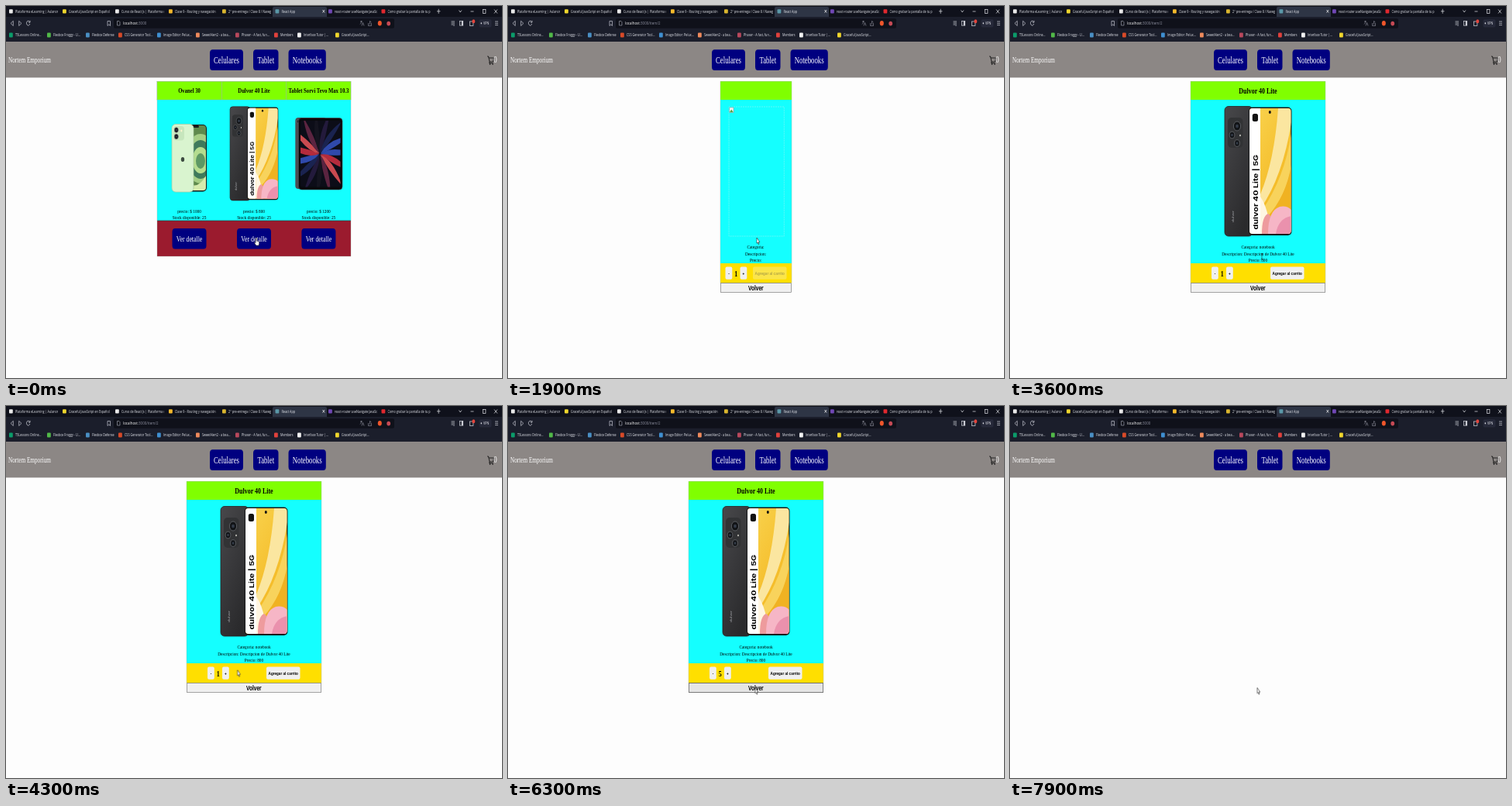
An HTML page that plays this animation: 640 px wide and 480 px high, repeating every 8000 ms.

```html
<!DOCTYPE html>
<html lang="es">
<head>
<meta charset="utf-8">
<title>React App</title>
<style>
html, body { margin: 0; width: 100%; height: 100%; overflow: hidden; background: #fdfdfd; }
svg { display: block; }
#stage { position: absolute; inset: 0; width: 100%; height: 100%; }
.ui { font-family: "Open Sans", sans-serif; font-size: 5px; fill: #e6e8ee; }
.url { font-family: "Open Sans", sans-serif; font-size: 6px; fill: #fff; }
.dim { fill: #8d90a0; }
.brand { font: 9.67px "Liberation Serif", serif; fill: #fff; }
.nav { font: 11.65px "Liberation Serif", serif; fill: #fff; }
.btn { font: 10.4px "Liberation Serif", serif; fill: #fff; }
.name { font: bold 8.9px "Liberation Serif", serif; }
.head { font: bold 10.6px "Liberation Serif", serif; }
.body { font: 7.11px "Liberation Serif", serif; }
.small { font: bold 6.15px "Liberation Sans", sans-serif; }
.back { font: bold 8.8px "Liberation Sans", sans-serif; }
.box { font: bold 10.8px Inter, sans-serif; }
.mid { text-anchor: middle; }

.home, .load, .item, .path, .hover, .hand, .arrow, .beam, .count { animation: 8s step-end infinite; }
.home { animation-name: home; }
.load { animation-name: load; }
.item { animation-name: item; }
.path { animation-name: path; }
.hover { animation-name: hover; }
.hand { animation-name: home; }
.arrow { animation-name: arrow; }
.beam { animation-name: beam; }
.count { animation-name: count; }
.pointer { animation: move 8s linear infinite; }

@keyframes home { 0% { opacity: 1 } 23.75%, 100% { opacity: 0 } }
@keyframes load { 0% { opacity: 0 } 23.75% { opacity: 1 } 45%, 100% { opacity: 0 } }
@keyframes item { 0% { opacity: 0 } 45% { opacity: 1 } 98.75%, 100% { opacity: 0 } }
@keyframes path { 0% { opacity: 0 } 23.75% { opacity: 1 } 98.75%, 100% { opacity: 0 } }
@keyframes hover { 0% { opacity: 0 } 72.5%, 100% { opacity: 1 } }
@keyframes arrow { 0% { opacity: 0 } 23.75% { opacity: 1 } 30% { opacity: 0 } 52.5%, 100% { opacity: 1 } }
@keyframes beam { 0% { opacity: 0 } 30% { opacity: 1 } 52.5%, 100% { opacity: 0 } }
@keyframes count {
  0% { transform: translateX(0) }
  56.25% { transform: translateX(-20px) }
  58.75% { transform: translateX(-40px) }
  61.25% { transform: translateX(-60px) }
  65%, 100% { transform: translateX(-80px) }
}
@keyframes move {
  0%, 23.74% { transform: translate(323px, 299px) }
  23.75%, 25% { transform: translate(321px, 299px); animation-timing-function: steps(5, start) }
  31.25%, 52.5% { transform: translate(325px, 323px); animation-timing-function: steps(3, start) }
  56.25%, 68.75% { transform: translate(285.5px, 349.5px); animation-timing-function: steps(4, start) }
  73.75%, 100% { transform: translate(319px, 363.5px) }
}
</style>
</head>
<body>
<script>
// The page is a 16:9 screen squeezed to 4:3, so all type is narrowed by the same factor.
const SQUEEZE = 0.75;
const text = (x, y, s, cls, extra = '', turn = '') =>
  `<text class="${cls}" transform="translate(${x} ${y}) scale(${SQUEEZE} 1) ${turn}" ${extra}>${s}</text>`;
const rect = (x, y, w, h, fill, extra = '') =>
  `<rect x="${x}" y="${y}" width="${w}" height="${h}" fill="${fill}" ${extra}/>`;
const oval = (x, y, rx, ry, fill, extra = '') =>
  `<ellipse cx="${x}" cy="${y}" rx="${rx}" ry="${ry}" fill="${fill}" ${extra}/>`;
const path = (d, fill, extra = '') => `<path d="${d}" fill="${fill}" ${extra}/>`;
const line = (d, color, w = 0.7) => path(d, 'none', `stroke="${color}" stroke-width="${w}"`);
const clipped = (x, y, w, h, s) => `<svg x="${x}" y="${y}" width="${w}" height="${h}">${s}</svg>`;
const navy = (x, y, w, h) => rect(x, y, w, h, '#000080', 'rx="3.500" ry="4.500"');
const frame = (x, y, w, h) => rect(x, y, w, h, 'none', 'stroke="#9fb5a8" stroke-width=".35"');

const tabs = [
  [4, '#e8e8e8', 'Plataforma eLearning | Aulanortes'],
  [73, '#f0d62c', 'Graceful JavaScript en Español'],
  [141, '#e8e8e8', 'Curso de React Js | Plataforma de'],
  [210, '#f5b92b', 'Clase 9 - Routing y navegación'],
  [279, '#d9b52e', '2° pre-entrega / Clase 8 / Navega'],
  [347.5, '#5a98a8', 'React App'],
  [416, '#7047b5', 'react-router:useNavigate JavaScript'],
  [484.5, '#e0282e', 'Como grabar la pantalla de tu pc']
];
const marks = [
  [4, '#0b9b6a', 'T5Lessons Online...'],
  [53, '#51b848', 'Flexbox Froggy - U...'],
  [103, '#4a8fc4', 'Flexbox Defense'],
  [145, '#d84a28', 'CSS Generator Tool...'],
  [195, '#3f8fd0', 'Image Editor: Pelux...'],
  [245, '#ee8a5c', 'SweetAlert2 - a bea...'],
  [296, '#b8485c', 'Phaser - A fast, fun...'],
  [346, '#e0413c', 'Members'],
  [376, '#f2f2f2', 'Interface Tutor |...'],
  [425, '#f0d62c', 'Graceful JavaScript...']
];

function chrome() {
  let s = rect(0, 0, 640, 14, '#0f111b') + rect(0, 14, 640, 32, '#1b1e2b') +
    path('M344 14V3q0-2 2-2h66q2 0 2 2v11z', '#2e3545');
  for (const [x, color, label] of tabs) {
    s += rect(x, 4.2, 4.8, 5.2, color, 'rx="1"') +
      clipped(x + 8, 0, 55, 14, text(0, 8.8, label, 'ui'));
  }
  s += line('M408.500 5l2.600 3.600M411.100 5L408.500 8.600', '#fff') +
    line('M556 6.800h4.500M558.200 3.800v6M584.500 5.500l1.700 2.500 1.700-2.500M599.500 7h4M630 4.500l4 5M634 4.500l-4 5', '#e4e5ea') +
    rect(615.3, 4.6, 3.6, 4.8, 'none', 'stroke="#e4e5ea" stroke-width=".7"');

  s += rect(139, 16.3, 362, 12.4, '#0f111a', 'rx="2"') +
    line('M9.300 19.300v6.200L6 22.400zM16.700 19.300v6.200L20 22.400z', '#c9cbd4') +
    line('M30.500 20.500a2.200 2.900 0 1 0 .3 2.500M31 18.800v2.400h-2', '#c9cbd4', 0.8) +
    line('M131 19.500h3.500v6l-1.700-1.600-1.800 1.600z', '#c9cbd4') +
    path('M143.500 19.500h2.500l1 1.200v4.300h-3.500z', 'none', 'stroke="#aeb1bd" stroke-width=".6"') +
    text(151, 24.3, 'localhost<tspan class="dim">:3000</tspan><tspan class="dim path">/item/2</tspan>', 'url') +
    line('M457 20h3M458.500 19v1q0 2.500-1.500 3.500M459 25.500l1.500-4 1.500 4M467.500 22v3.500h4V22M469.500 24v-4.500l2 1.500', '#9a9daa', 0.6) +
    oval(482.3, 22.3, 2.5, 3.3, '#f0562b') + oval(493.7, 22.6, 2.4, 2.9, '#c64a55') +
    line('M574.500 20h4.500M574.500 22h4.500M574.500 24h2.500M578 23v3', '#d5d7de') +
    rect(585.5, 19.5, 4.2, 5.6, 'none', 'stroke="#d5d7de" stroke-width=".7"') + rect(587.8, 19.5, 1.9, 5.6, '#d5d7de') +
    rect(598.5, 20, 4.4, 5.4, 'none', 'stroke="#d5d7de" stroke-width=".7"') + oval(603.3, 19.8, 2, 2.5, '#e2453c') +
    rect(610.5, 17.2, 16, 10.2, '#262939', 'rx="2"') + oval(613.3, 22.3, 0.8, 1.1, '#d5d7de') +
    text(616, 24.1, 'VPN', 'ui') +
    line('M631 20h4M631 22.300h4M631 24.600h4', '#d5d7de');

  for (const [x, color, label] of marks)
    s += rect(x, 34.6, 4.8, 5.8, color, 'rx="1"') + text(x + 8, 39.3, label, 'ui');
  return s;
}

function header() {
  const button = (x, w, label) => navy(x, 56.3, w, 26.7) + text(x + w / 2, 74, label, 'nav mid');
  return rect(0, 46, 640, 46.4, '#8c8785') + text(3, 73, 'Nortem Emporium', 'brand') +
    button(263, 43, 'Celulares') + button(319, 32.5, 'Tablet') + button(364.5, 48.3, 'Notebooks') +
    line('M621 65h1.500l1.500 7h4.500l1-5h-6.500M624 72l-.4 1.800h5', '#151515', 0.9) +
    oval(624.5, 75, 0.7, 0.9, '#151515') + oval(628, 75, 0.7, 0.9, '#151515') +
    text(629.2, 73.3, '0', 'nav');
}

const lens = (x, y, r) => oval(x, y, r, r * 1.3, '#121417', 'stroke="#7d8085" stroke-width=".6"') +
  oval(x, y, r * 0.4, r * 0.5, '#343c49');

// Phone pair drawn at the size of the detail page.
const phone = `<g id="phone">` +
  rect(277, 129.5, 36, 167.5, 'url(#slate)', 'rx="5" stroke="#222" stroke-width=".8"') +
  rect(281, 144, 19.5, 39, '#323335', 'rx="5"') +
  lens(293, 155, 4.6) + lens(286.5, 166.5, 3.3) + lens(293, 177, 3.3) + oval(297, 167, 0.8, 1.2, '#d8d8d0') +
  text(289, 279, 'dulvor', 'ui', 'opacity=".7"', 'rotate(-90)') +
  rect(308, 130.5, 55.5, 165.5, '#17181a', 'rx="5"') +
  `<g clip-path="url(#glass)">` + rect(309, 132, 53.5, 162, 'url(#gold)') +
  path('M346 132Q341 200 323 243V262Q352 220 363 150V132Z', '#fbe6a0') +
  path('M363 165Q354 222 325 264L340 294H363Z', '#f8d35c') +
  path('M363 205Q356 246 332 272L363 290Z', '#f0b222') +
  path('M323 246Q334 262 336 294H323Z', '#fff6e2') +
  path('M325 294Q325 271 333 268Q341 273 339 294Z', '#ee9b9d') +
  path('M333 294Q333 264 348 259Q358 257 364 264V294Z', '#f6b6c6') +
  path('M343 294Q346 274 363 271V294Z', '#ea91ad') +
  rect(308, 131, 15, 164, '#fff') + `</g>` +
  oval(335.3, 137, 1.5, 2, '#111') +
  rect(312.8, 139, 7.2, 10, '#111', 'rx="2.500"') +
  text(319.8, 288.5, 'dulvor 40 Lite | 5G', 'box', '', 'rotate(-90)') + `</g>`;

function greenPhone() {
  return rect(229, 153, 30, 86.5, '#16191a', 'rx="5"') +
    `<g clip-path="url(#mint)">` + rect(230, 154, 28, 84, '#5f8a4c') +
    oval(251, 197, 20, 32, '#a4cd84') + oval(251, 198, 15, 25, '#3f7a5c') +
    oval(251, 199, 10.5, 17, '#b4dc8f') + oval(251, 200, 6, 10, '#5d9864') +
    path('M230 224Q246 241 258 219V238H230Z', '#d6ebad') + `</g>` +
    rect(240, 154, 9, 3, '#16191a', 'rx="1.500"') +
    rect(214, 152.5, 28, 87.5, '#d9f4cf', 'rx="5" stroke="#a9c9a0" stroke-width=".7"') +
    rect(216, 155, 14, 18.5, '#c7e6bd', 'rx="4"') +
    lens(219.8, 160, 2.5) + lens(219.8, 168.5, 2.5) + oval(226.3, 161, 1, 1.4, '#fff6cf') +
    oval(228, 198, 2.2, 3, '#3c4a40');
}

function tablet() {
  const colors = ['#2f49ab', '#14141f', '#b42b3c', '#231a3c', '#c94a50', '#1a2350', '#5b2440'];
  let s = rect(373.3, 144, 40, 92, '#4b4e53', 'rx="4"') + lens(376.6, 149, 1.5) +
    rect(377.5, 144.5, 56.5, 92.5, '#08090c', 'rx="4" stroke="#4a4c51" stroke-width=".6"') +
    `<g clip-path="url(#pad)">` + rect(380, 148, 51.5, 85.5, '#0c0d18');
  for (let i = 0; i < 15; i++) {
    s += path('M1 0Q18-14 52-8Q26 0 1 0Z', colors[i * 2 % 7],
      `transform="translate(405 191) scale(.8 1.050) rotate(${i * 24 + 8})"`);
  }
  return s + `</g>`;
}

function home() {
  const items = [[236.5, 'Ovanel 30', 1000], [320, 'Dulvor 40 Lite', 800], [403.4, 'Tablet Sorvi Tevo Max 10.3', 1200]];
  let s = rect(195, 97, 250, 24, '#80ff00') + rect(195, 121, 250, 156, '#14ffff') +
    rect(195, 277, 250, 46, '#9b1b2e') + line('M195 277h250', '#303a3a', 0.7);
  for (const [x, name, price] of items) {
    s += frame(x - 41.7, 97.2, 83.4, 23.8) + text(x, 112, name, 'name mid') +
      text(x, 267, 'precio: $ ' + price, 'body mid') +
      text(x, 275, 'Stock disponible: 25', 'body mid') +
      navy(x - 22, 287, 44, 26.4) + text(x, 303.8, 'Ver detalle', 'btn mid');
  }
  return `<g class="home">${s}${frame(195, 97.2, 250, 225.8)}${greenPhone()}${tablet()}` +
    `<use href="#phone" transform="translate(89.600 36.200) scale(.72 .723)"/></g>`;
}

// Detail card: left edge, width, left edge of the counter, left edge of the add button.
function card(x, w, cx, ax, off) {
  const key = (kx, s) => rect(kx, 336.5, 8.8, 16.3, '#f0f0f0', 'rx="2"') + text(kx + 4.4, 346.8, s, 'small mid');
  return rect(x, 97, w, 24, '#80ff00') + rect(x, 121, w, 211, '#14ffff') + rect(x, 332, w, 25.5, '#ffdf00') +
    frame(x, 97.2, w, 260) + key(cx, '-') + key(cx + 19, '+') +
    rect(ax, 336.5, 43.5, 16.3, '#f0f0f0', `rx="2" opacity="${off ? 0.3 : 1}"`) +
    text(ax + 21.75, 347, 'Agregar al carrito', 'small mid', off ? 'fill="#b3a646"' : '') +
    rect(x + 0.3, 357.7, w - 0.6, 11.7, '#f0f0f0', 'stroke="#6b6b6b" stroke-width=".6"');
}
const back = text(319.8, 366.7, 'Volver', 'back mid');

function load() {
  return `<g class="load">` + card(274, 92, 280.5, 316, true) + back +
    text(294.2, 348.5, '1', 'head mid') +
    rect(285, 130, 71.3, 167, 'none', 'stroke="#8ff3f3" stroke-width=".6" stroke-dasharray="2 1"') +
    rect(285.8, 131, 5.2, 6.5, '#f4f4f4', 'stroke="#8a8a8a" stroke-width=".5"') +
    path('M286 137l2.200-3.500 2.500 3.500z', '#58a548') +
    text(319.5, 313, 'Categoria:', 'body mid') + text(319.5, 321.5, 'Descripcion:', 'body mid') +
    text(319.5, 329.7, 'Precio:', 'body mid') + `</g>`;
}

function item() {
  const digits = [1, 2, 3, 4, 5].map((n, i) => text(5 + i * 20, 12.5, n, 'head mid')).join('');
  return `<g class="item">` + card(233, 174, 260, 336, false) +
    rect(233.3, 357.7, 173.4, 11.7, '#e5e5e5', 'class="hover" stroke="#4d4d4d" stroke-width=".6"') + back +
    text(320, 112.5, 'Dulvor 40 Lite', 'head mid') + `<use href="#phone"/>` +
    text(320, 313, 'Categoria: notebook', 'body mid') +
    text(320, 321.5, 'Descripcion: Descripcion de Dulvor 40 Lite', 'body mid') +
    text(320, 329.7, 'Precio: 800', 'body mid') +
    clipped(268.8, 336, 10, 18, `<g class="count">${digits}</g>`) + `</g>`;
}

const edge = 'stroke="#111" stroke-width=".55" stroke-linejoin="round"';
const pointer = `<g class="pointer">` +
  `<g class="hand">` + path('M-.8 .5Q0-.6 .8 .5V4.200L3 4.900Q4 5.300 3.800 6.700L3.200 10H-.4L-2.400 6.600Q-2.600 5.300-.8 6.300Z', '#fff', edge) + `</g>` +
  `<g class="arrow">` + path('M0 0V7.200L1.200 6L2.100 8.600L3 8L2.200 5.600H3.800Z', '#fff', edge) + `</g>` +
  `<g class="beam">` + line('M-1.200-3.600h2.400M0-3.600v7.200M-1.200 3.600h2.400', '#222', 0.6) + `</g></g>`;

const clip = (id, shape) => `<clipPath id="${id}">${shape}</clipPath>`;
const ramp = (id, a, b) => `<linearGradient id="${id}" x2=".6" y2="1"><stop stop-color="${a}"/><stop offset="1" stop-color="${b}"/></linearGradient>`;
const defs = '<defs>' + ramp('slate', '#48484b', '#2a2a2c') + ramp('gold', '#f9d450', '#f3b41c') +
  clip('glass', rect(309, 132, 53.5, 162, '#000', 'rx="4"')) +
  clip('mint', rect(230, 154, 28, 84, '#000', 'rx="4"')) +
  clip('pad', rect(380, 148, 51.5, 85.5, '#000', 'rx="2"')) + phone + '</defs>';

document.body.innerHTML =
  `<svg id="stage" viewBox="0 0 640 480" preserveAspectRatio="none">${defs}` +
  rect(0, 0, 640, 480, '#fdfdfd') + chrome() + header() + home() + load() + item() + pointer + '</svg>';
</script>
</body>
</html>
```
